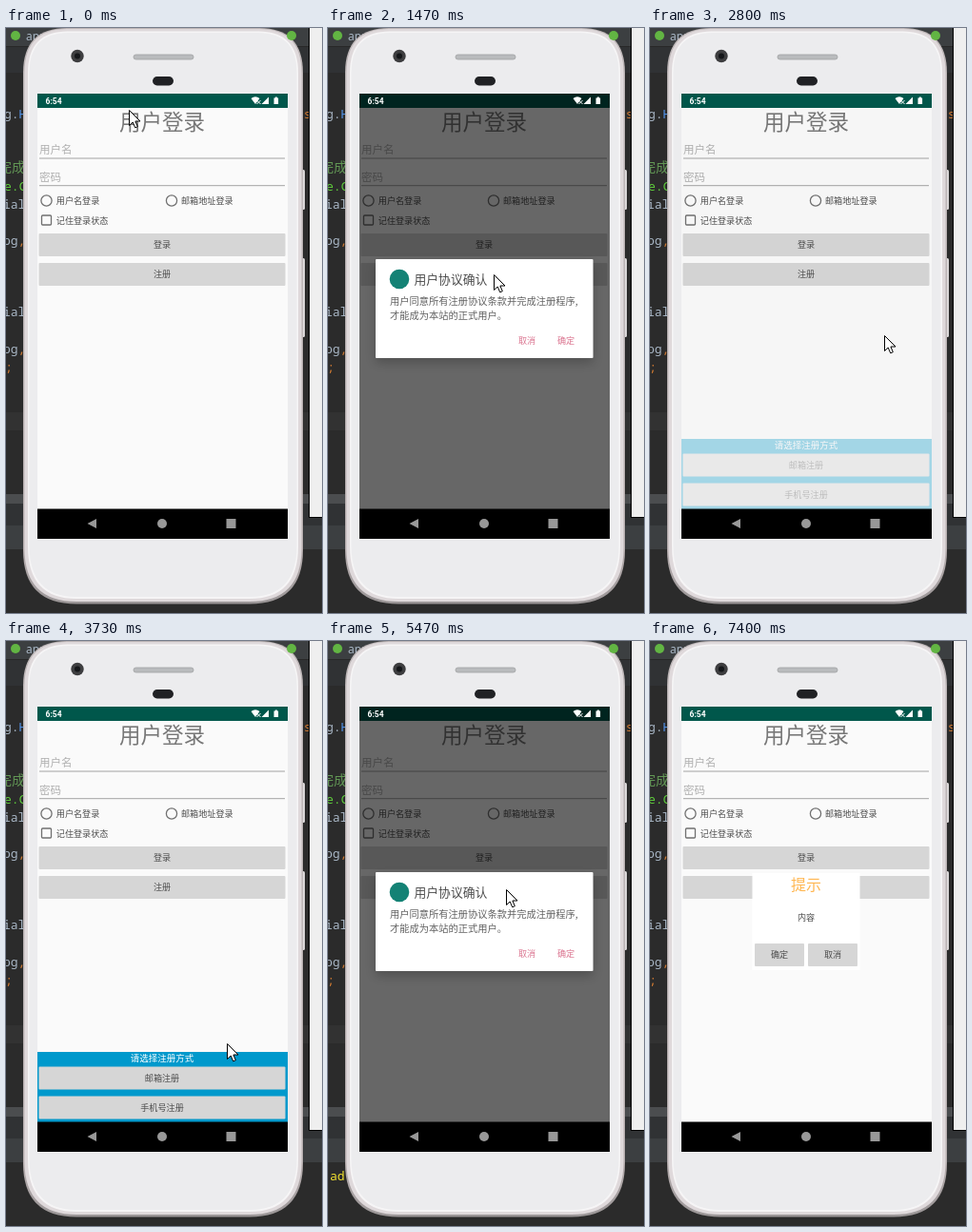
An HTML page that plays this animation: 332 by 615 pixels, repeating every 8390 ms.

```html
<!DOCTYPE html>
<html lang="zh-CN">
<head>
<meta charset="utf-8">
<title>用户登录</title>
<style>
  html, body { margin: 0; width: 100%; height: 100%; overflow: hidden; background: #2b2b2b; }
  svg { display: block; width: 332px; height: 615px; }
  text { font: 9.1px "Noto Sans CJK SC", "Noto Sans CJK", sans-serif; fill: #4c4c4c; }
  .mid { text-anchor: middle; }
  .hint { font-size: 11.5px; fill: #b0b0b0; }
  .body { font-size: 10.25px; fill: #606060; }
  .action { fill: #db7590; }
  .code text { font: 13px "Noto Sans Mono", "Noto Sans CJK SC", monospace; fill: #a9b7c6; }
  .code .key { fill: #cc7832; }
  .btn { fill: #d6d6d6; }
  .box { fill: none; stroke: #707070; stroke-width: 1.3; }
</style>
</head>
<body>
<svg viewBox="0 0 332 615">
  <defs>
    <linearGradient id="rim" x2="0" y2="1">
      <stop offset="0" stop-color="#bdb6b7"/>
      <stop offset=".9" stop-color="#b9b0b1"/>
      <stop offset="1" stop-color="#9a9596"/>
    </linearGradient>
    <filter id="shadow" x="-20%" y="-20%" width="140%" height="150%">
      <feDropShadow dx="0" dy="5" stdDeviation="6" flood-opacity=".22"/>
    </filter>
  </defs>

  <!-- Editor behind the phone -->
  <g class="code">
    <rect width="332" height="615" fill="#2b2b2b"/>
    <rect width="332" height="19" fill="#3c3f41"/>
    <rect y="19" width="332" height="1" fill="#282828"/>
    <rect y="20" width="332" height="27" fill="#303234"/>
    <rect y="404" width="332" height="19" fill="#323232"/>
    <rect y="490" width="332" height="10" fill="#4b4d4f"/>
    <rect y="500" width="332" height="23" fill="#303234"/>
    <rect y="523" width="332" height="25" fill="#3c3f41"/>
    <circle cx="10" cy="8" r="5" fill="#62b543"/>
    <text x="21" y="13" style="font:12px 'Noto Sans',sans-serif">app</text>
    <text x="-2" y="95">g.<tspan fill="#5394ec">H</tspan></text>
    <text x="-8" y="151" style="font-size:14px;fill:#629755">完成</text>
    <text x="-2" y="171" style="fill:#5fce3c">e.C</text>
    <text x="-3" y="190">ial</text>
    <text x="-3" y="228">pg<tspan class="key">,</tspan></text>
    <text x="-3" y="303">ial</text>
    <text x="-3" y="342">pg<tspan class="key">,</tspan></text>
    <text x="-1" y="361" class="key">;</text>
    <text x="305" y="95" class="key">is</text>
    <text id="log" x="2" y="567" style="fill:#f0e030">ad</text>
    <path d="M318 0h14v515h-14z"/>
    <path d="M319 0h13v514h-13z" fill="#efefef"/>
  </g>

  <!-- Phone -->
  <rect x="309" y="149" width="5" height="42" rx="1.500" fill="#dcd8d9"/>
  <rect x="309" y="242" width="5" height="83" rx="1.500" fill="#dcd8d9"/>
  <path d="M18 47Q18 0 64 0H266Q312 0 312 47V549Q312 605.500 256 605.500H74Q18 605.500 18 549Z" fill="url(#rim)"/>
  <path d="M19.500 47Q19.500 1 64 1H266Q310.500 1 310.500 47V547Q310.500 603 256 603H74Q19.500 603 19.500 547Z" fill="#dfd9db"/>
  <path d="M23 47Q23 3.500 65 3.500H265Q307 3.500 307 47V545Q307 600 256 600H74Q23 600 23 545Z" fill="#f6f5f6"/>
  <path d="M24.500 47Q24.500 5 65 5H265Q305.500 5 305.500 47V544Q305.500 598 256 598H74Q24.500 598 24.500 544Z" fill="#ececee"/>
  <circle cx="300" cy="8" r="5" fill="#62b543"/>
  <circle cx="75" cy="29.500" r="6.700" fill="#3d3d3f"/>
  <circle cx="75" cy="29.500" r="3" fill="#15171a"/>
  <rect x="134" y="28" width="63" height="5" rx="2.500" fill="#b9bbbd" stroke="#a0a1a3" stroke-width=".8"/>
  <rect x="154" y="51" width="22" height="9.500" rx="4.750" fill="#202124"/>

  <!-- Login screen -->
  <rect x="33" y="69" width="263" height="468" fill="#fafafa"/>
  <rect x="33" y="69" width="263" height="15" fill="#00574b"/>
  <text x="164" y="107" class="mid" style="font-size:22.500px;fill:#777">用户登录</text>
  <text x="35" y="132.300" class="hint">用户名</text>
  <text x="35" y="161.300" class="hint">密码</text>
  <path d="M35 137H293M35 165.700H293" stroke="#a3a3a3"/>
  <circle cx="42.500" cy="181.500" r="5.600" class="box"/>
  <circle cx="174" cy="181.500" r="5.600" class="box"/>
  <rect x="37.500" y="197" width="10" height="10" rx="1" class="box"/>
  <text x="52.800" y="185">用户名登录</text>
  <text x="184" y="185">邮箱地址登录</text>
  <text x="52.800" y="205.500">记住登录状态</text>
  <rect x="34.500" y="216" width="259" height="24" rx="1" class="btn"/>
  <rect x="34.500" y="247" width="259" height="24" rx="1" class="btn"/>
  <rect id="press" x="34.500" y="247" width="259" height="24" rx="1" opacity="0"/>
  <text x="164" y="231.200" class="mid">登录</text>
  <text x="164" y="261.700" class="mid">注册</text>

  <g id="sheet">
    <rect x="33" y="432" width="263" height="74" fill="#0099cc"/>
    <text x="164" y="442" class="mid" style="font-size:9.500px;font-weight:500;fill:#fff">请选择注册方式</text>
    <rect x="34.500" y="447.500" width="259" height="24" rx="1" class="btn"/>
    <rect x="34.500" y="478.500" width="259" height="24" rx="1" class="btn"/>
    <text x="164" y="463" class="mid">邮箱注册</text>
    <text x="164" y="494" class="mid">手机号注册</text>
  </g>

  <g id="tip">
    <rect x="107.500" y="244" width="113" height="102" fill="#fff"/>
    <text x="164" y="262" class="mid" style="font-size:16px;fill:#ffb752">提示</text>
    <text x="164" y="293.500" class="mid">内容</text>
    <rect x="110" y="318" width="52" height="24" rx="1" class="btn"/>
    <rect x="166" y="318" width="52" height="24" rx="1" class="btn"/>
    <text x="136" y="333" class="mid">确定</text>
    <text x="192" y="333" class="mid">取消</text>
  </g>

  <rect id="dim" x="33" y="69" width="263" height="437"/>

  <g id="dialog">
    <rect x="50" y="243" width="228.500" height="104" rx="1" fill="#fff" filter="url(#shadow)"/>
    <circle cx="75" cy="264" r="10.300" fill="#148275"/>
    <text x="90.500" y="269" style="font-size:12.800px">用户协议确认</text>
    <text x="65" y="290.700" class="body">用户同意所有注册协议条款并完成注册程序,</text>
    <text x="65" y="305.700" class="body">才能成为本站的正式用户。</text>
    <text x="200" y="331.800" class="action">取消</text>
    <text x="241" y="331.800" class="action">确定</text>
  </g>

  <!-- System bars -->
  <text x="41.500" y="79.500" style="font:bold 8.500px Roboto,sans-serif;fill:#fff">6:54</text>
  <path d="M257.500 74Q262 70.500 266.500 74L262 80ZM268.500 80H276V72.500Z M281.500 73.500h1.300v-1h2v1h1.300V80h-4.600Z" fill="#fff"/>
  <path d="M263.500 76l4 4m0-4l-4 4" stroke="#fff"/>
  <rect x="33" y="505.500" width="263" height="31.500"/>
  <path d="M85.500 521L95 516V526ZM231.500 516H241.500V526H231.500Z" fill="#989898"/>
  <circle cx="164" cy="521" r="5" fill="#989898"/>

  <path id="cursor" d="M.5 .5V16.500L4.200 13L6.700 18.800L9.300 17.700L6.900 12H12Z" fill="#fff" stroke="#000"/>
</svg>
<script>
const LOOP = 8390, TICK = 1000 / 15;
const el = id => document.getElementById(id);
const clamp = v => Math.max(0, Math.min(1, v));
const show = (id, opacity) => el(id).setAttribute('opacity', opacity);

// Rises from 0 before tick `start` to 1 over `length` ticks.
const ramp = (tick, start, length) => clamp((tick - start + 1) / length);
const pulse = (tick, start, rise, end, fall) =>
  ramp(tick, start, rise) * (1 - ramp(tick, end, fall));

// Pointer path: tick, x, y
const path = [
  [0, 129, 86], [5, 176, 205], [7, 187, 250], [9, 174, 259],
  [25, 174, 259], [31, 238, 300], [34, 253, 319], [36, 246, 323],
  [45, 246, 323], [50, 263, 368], [56, 232, 423], [58, 208, 422],
  [59, 208, 422], [66, 180, 242], [68, 183, 254], [69, 183, 254], [73, 187, 261],
  [82, 187, 261], [91, 208, 323],
  [100, 208, 323], [107, 146, 516], [111, 87, 620]
];

function pointerAt(tick) {
  const i = path.findIndex(p => p[0] > tick);
  if (i < 0) return path[path.length - 1].slice(1);
  const [t0, x0, y0] = path[i - 1], [t1, x1, y1] = path[i];
  const f = (tick - t0) / (t1 - t0);
  return [x0 + (x1 - x0) * f, y0 + (y1 - y0) * f];
}

function draw(time) {
  const tick = Math.floor((time % LOOP + 4) / TICK);

  show('dim', 0.59 * (pulse(tick, 20, 3, 39, 4.1) + pulse(tick, 80, 3, 96, 4.1)));
  show('dialog', pulse(tick, 20, 3, 39, 1.9) + pulse(tick, 80, 3, 96, 1.9));
  show('sheet', pulse(tick, 42, 3, 60, 2));
  show('tip', ramp(tick, 99, 3));
  show('press', tick === 13 || tick === 74 ? 0.1 : 0);

  show('log', tick >= 64 && tick < 86 ? 1 : 0);
  el('log').setAttribute('y', tick < 72 ? 586 : 567);

  el('cursor').setAttribute('transform', `translate(${pointerAt(tick)})`);
}

const start = performance.now();
function frame() {
  draw(performance.now() - start);
  requestAnimationFrame(frame);
}
frame();
</script>
</body>
</html>
```
